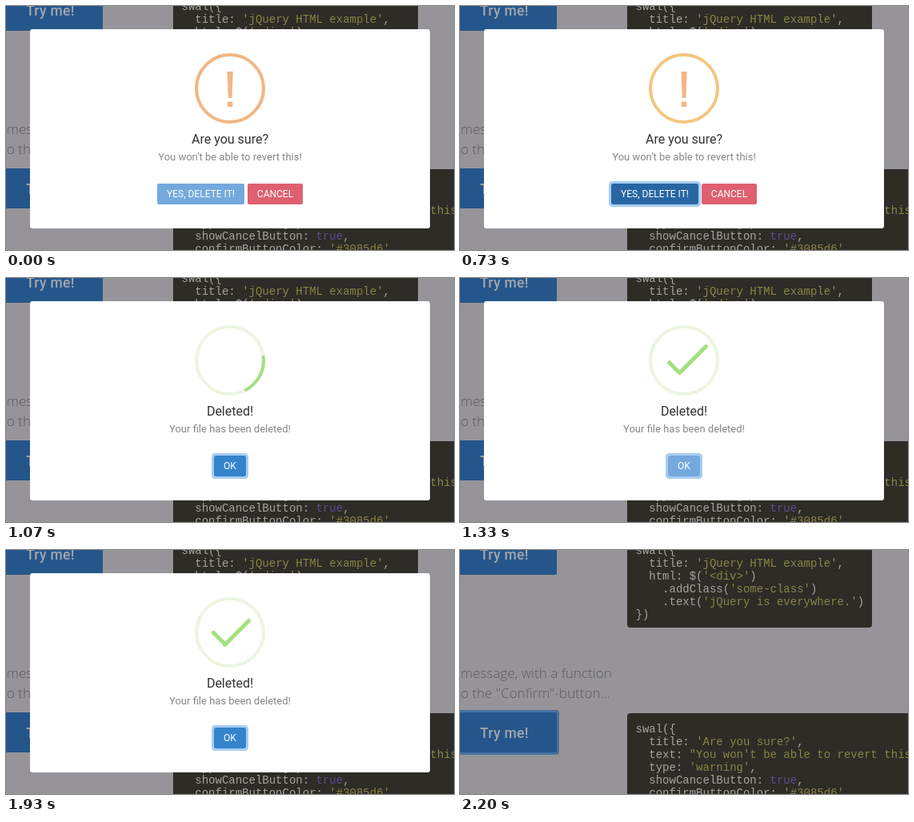
Recreate the animation shown at these times as an HTML page. Size 560 by 305 pixels, loop 2.27 s.

```html
<!DOCTYPE html>
<html lang="en">
<head>
<meta charset="utf-8">
<title>Confirm dialog</title>
<style>
html, body { margin: 0; width: 100%; height: 100%; overflow: hidden; background: #969498; }
svg { display: block; width: 100vw; height: 100vh; }
text { font-family: Roboto, sans-serif; }
.code text { font: 14px "Liberation Mono", monospace; fill: #a5a49e; white-space: pre; }
.code .str { fill: #888545; }
.code .lit { fill: #5f4b8e; }
.para text { font: 300 17.1px "Open Sans", sans-serif; fill: #5c5a5e; }
.try { fill: #25568b; }
.try text { font-size: 17.5px; font-weight: 500; letter-spacing: .3px; fill: #a3a6ab; }
#modal text { text-anchor: middle; }
.title { font-size: 16px; fill: #333; }
.sub { font-size: 13px; fill: #868686; }
.btn text { font-size: 12px; fill: #fff; }
.ring { fill: none; stroke: #a6cef2; stroke-width: 3; }
.mark rect { fill: #a3e07e; }
</style>
</head>
<body>
<svg viewBox="0 0 560 305">
  <rect width="560" height="305" fill="#969498"/>
  <g class="para">
    <text x=".8" y="160">message, with a function</text>
    <text x=".8" y="185">o the "Confirm"-button...</text>
  </g>
  <g class="try">
    <rect x="-11" y="-19" width="132" height="50" rx="2"/>
    <text x="25" y="12">Try me!</text>
    <rect id="tryRing" x="-14" y="200" width="138" height="56" rx="4" fill="#47729f"/>
    <rect x="-11" y="203" width="132" height="50" rx="2"/>
    <text x="25" y="234.5">Try me!</text>
  </g>
  <rect x="209" y="-20" width="306" height="117" rx="4" fill="#2d2c27"/>
  <rect x="209" y="204" width="370" height="120" rx="4" fill="#2d2c27"/>
  <g class="code" id="code"></g>

  <g id="modal">
    <rect x="30" y="29" width="500" height="249" rx="3" fill="#fff"/>
    <g id="ask">
      <circle id="pulse" cx="280" cy="103" r="42" fill="none" stroke-width="4"/>
      <path d="M276.5 82h7.2l-1.3 33h-4.6zM277 119.5h6.2v6.5h-6.2z" fill="#f3b583"/>
      <text class="title" x="280" y="172">Are you sure?</text>
      <text class="sub" x="280" y="193">You won't be able to revert this!</text>
      <g class="btn">
        <rect class="ring" id="yesRing" x="187.5" y="220.5" width="112" height="29" rx="3"/>
        <rect id="yes" x="189" y="222" width="109" height="26" rx="2"/>
        <text x="243.5" y="239">YES, DELETE IT!</text>
        <rect x="302" y="222" width="69" height="26" rx="2" fill="#de6070"/>
        <text x="336.5" y="239">CANCEL</text>
      </g>
    </g>
    <g id="done">
      <g transform="translate(240 63)">
        <circle cx="40" cy="40" r="42" fill="none" stroke="#a3e07e" stroke-width="4"/>
        <g fill="#fff">
          <path d="M27-7a60 60 0 0 0 0 120z" transform="rotate(-45 27 53)"/>
          <path id="sweep" d="M30-11a60 60 0 0 1 0 120z"/>
          <rect x="28" y="8" width="5" height="90" transform="rotate(-45 30.5 53)"/>
        </g>
        <circle cx="40" cy="40" r="42" fill="none" stroke="#aed389" stroke-opacity=".24" stroke-width="4"/>
        <g class="mark">
          <rect id="tip" height="5" rx="2"/>
          <rect id="long" height="5" rx="2"/>
        </g>
      </g>
      <text class="title" x="280" y="172">Deleted!</text>
      <text class="sub" x="280" y="193">Your file has been deleted!</text>
      <g class="btn">
        <rect class="ring" id="okRing" x="258.5" y="220.5" width="43" height="29" rx="3"/>
        <rect id="ok" x="260" y="222" width="40" height="26" rx="2"/>
        <text x="280" y="239">OK</text>
      </g>
    </g>
  </g>
</svg>
<script>
const LOOP = 2270, STEP = 200 / 3;
const CONFIRMED = 750, CLOSED = 2050;
const REST = '#74a9de', HOVER = '#307bc3', PRESSED = '#2866a3';
const $ = id => document.getElementById(id);
const set = (id, attrs) => {
  for (const k in attrs) $(id).setAttribute(k, attrs[k]);
};
const show = (id, on) => set(id, { visibility: on ? 'inherit' : 'hidden' });
const clamp = x => Math.min(1, Math.max(0, x));

function bezier(x1, y1, x2, y2) {
  const at = (a, b, u) => 3 * (1 - u) ** 2 * u * a + 3 * (1 - u) * u * u * b + u ** 3;
  return x => {
    let lo = 0, hi = 1;
    for (let i = 0; i < 24; i++) {
      const mid = (lo + hi) / 2;
      if (at(x1, x2, mid) < x) lo = mid; else hi = mid;
    }
    return at(y1, y2, lo);
  };
}
const ease = bezier(.25, .1, .25, 1), easeIn = bezier(.42, 0, 1, 1);

// Keys are [position, ...values]; easing applies between neighbours.
function keyframes(p, keys, fn = ease) {
  p = clamp(p);
  const i = Math.max(1, keys.findIndex(k => k[0] >= p));
  const [p0, ...a] = keys[i - 1], [p1, ...b] = keys[i];
  const e = fn(clamp((p - p0) / (p1 - p0)));
  return a.map((v, j) => v + (b[j] - v) * e);
}

const escape = s => s.replace(/</g, '&lt;');
function codeBlock(y, lines) {
  return lines.map((line, i) => {
    const html = escape(line).replace(/'[^']*'|"[^"]*"|\btrue\b/g,
      m => `<tspan class="${m === 'true' ? 'lit' : 'str'}">${m}</tspan>`);
    return `<text x="219.5" y="${y + 16 * i}">${html}</text>`;
  }).join('');
}
$('code').innerHTML = codeBlock(4.5, [
  'swal({',
  "  title: 'jQuery HTML example',",
  "  html: $('<div>')",
  "    .addClass('some-class')",
  "    .text('jQuery is everywhere.')",
  '})'
]) + codeBlock(227.5, [
  'swal({',
  "  title: 'Are you sure?',",
  '  text: "You won\'t be able to revert this!",',
  "  type: 'warning',",
  '  showCancelButton: true,',
  "  confirmButtonColor: '#3085d6',"
]);

function bar(id, x, y, w, angle) {
  set(id, { x, y, width: Math.max(0, w), transform: `rotate(${angle} ${x + w / 2} ${y + 2.5})` });
}

function drawAsk(t) {
  const phase = Math.abs((t - 130) / 750);
  const yellow = 1 - ease(1 - clamp(phase));
  set('pulse', { stroke: `rgb(243,${181 + 24 * yellow},${130 - 2 * yellow})` });
  set('yes', { fill: t < 100 ? REST : t < 660 ? HOVER : PRESSED });
  show('yesRing', t > 660);
}

function drawDone(t) {
  const age = t - CONFIRMED, p = age / 750;
  const [turn] = keyframes(age / 4250, [[0, -45], [.05, -45], [.12, -405], [1, -405]], easeIn);
  set('sweep', { transform: `rotate(${turn} 30 49)` });

  const [tx, ty, tw] = keyframes(p,
    [[0, 1, 19, 0], [.54, 1, 19, 0], [.7, -8, 37, 50], [.84, 21, 48, 17], [1, 14, 45, 25]]);
  bar('tip', tx, ty, tw, 45);
  const [right, ly, lw] = keyframes(p,
    [[0, 46, 54, 0], [.65, 46, 54, 0], [.84, 0, 35, 55], [1, 8, 38, 47]]);
  bar('long', 80 - right - lw, ly, lw, -45);

  const hovered = t < 1200 || t > 1800;
  set('ok', { fill: t > 1980 ? PRESSED : hovered ? '#3583cc' : REST });
  show('okRing', t < CLOSED);
}

function draw(t) {
  const asking = t < CONFIRMED;
  show('ask', asking);
  show('done', !asking);
  show('tryRing', t > CLOSED);
  if (asking) drawAsk(t); else drawDone(t);

  let scale = 1, opacity = 1;
  if (t > CLOSED) {
    [scale, opacity] = keyframes((t - CLOSED) / 150, [[0, 1, 1], [1, .5, 0]]);
  } else if (!asking) {
    [scale] = keyframes((t - CONFIRMED) / 300, [[0, .7], [.45, 1.05], [.8, .95], [1, 1]]);
  }
  set('modal', {
    opacity,
    transform: `translate(280 153.5) scale(${scale}) translate(-280 -153.5)`
  });
}

const start = performance.now();
function tick() {
  const t = (performance.now() - start) % LOOP;
  draw(Math.floor((t + 4) / STEP) * STEP);
  requestAnimationFrame(tick);
}
tick();
</script>
</body>
</html>
```
